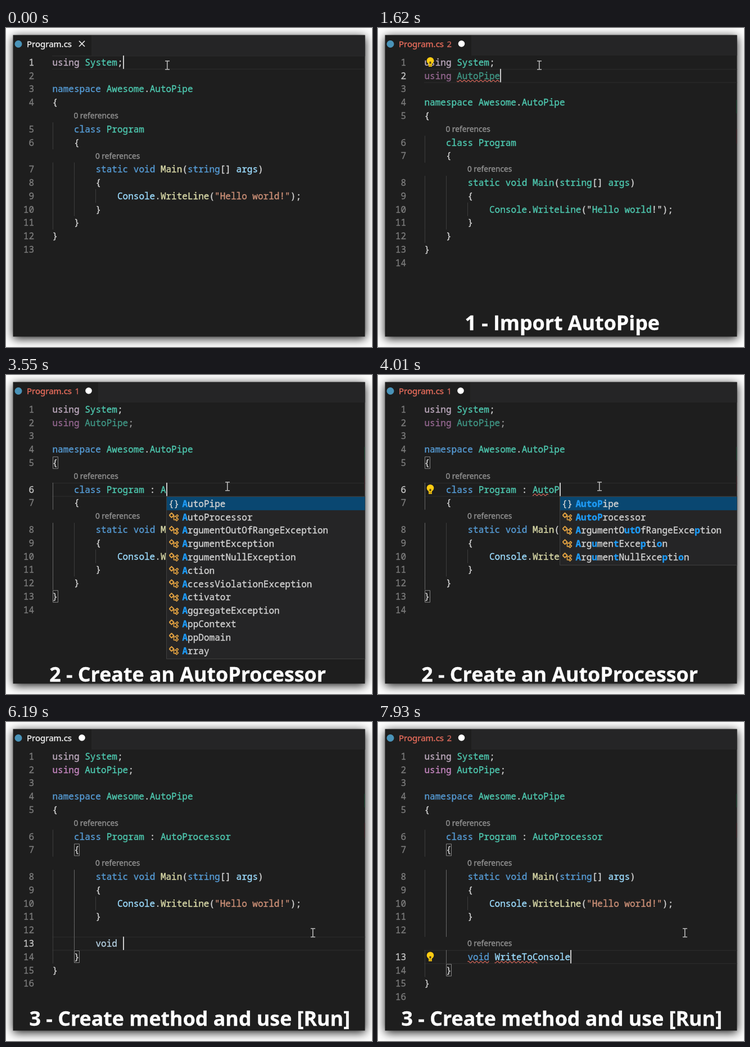
An HTML page with a canvas for the animation above (8000 ms loop, 651x568 px).

```html
<!DOCTYPE html>
<html lang="en">
<head>
<meta charset="utf-8">
<title>Editor walkthrough</title>
<style>
html, body { margin: 0; width: 100%; height: 100%; overflow: hidden; background: #fefefe; }
canvas { display: block; }
</style>
</head>
<body>
<canvas id="stage" width="651" height="568"></canvas>
<script>
const ctx = document.getElementById('stage').getContext('2d');
const LOOP = 8000, CHAR = 9.62, LEFT = 82.5, ROW = 23.8, TOP = 61;
const MONO = '"Noto Sans Mono", "DejaVu Sans Mono", monospace';
const SANS = '"Noto Sans", "Open Sans", sans-serif';
const COLOR = {
  bg: '#1e1e1e', bar: '#252526', text: '#d4d4d4', key: '#569cd6', type: '#4ec9b0',
  fn: '#dcdcaa', name: '#9cdcfe', str: '#ce9178', use: '#c586c0', match: '#1e9bf5',
  error: '#e86d5c', amber: '#e0a040'
};

const WORDS = {};
const addWords = (color, list) => list.split(' ').forEach(w => WORDS[w] = color);
addWords(COLOR.key, 'namespace class static void string');
addWords(COLOR.type, 'System Awesome AutoPipe Program AutoProcessor');
addWords(COLOR.fn, 'Main WriteLine');
addWords(COLOR.use, 'using');

// Keystrokes: each part of the text with the time it is entered
const USING = [[340, 'u'], [410, 's'], [480, 'i'], [550, 'n'], [620, 'g'], [770, ' '],
  [960, 'A'], [1030, 'u'], [1090, 't'], [1160, 'o'], [1290, 'P'], [1360, 'i'], [1490, 'p'], [1560, 'e'], [1750, ';']];
const BASE = [[3080, ' '], [3220, ':'], [3360, ' '],
  [3560, 'A'], [3690, 'u'], [3750, 't'], [3820, 'o'], [3950, 'P'], [4080, 'r'], [4340, 'ocessor']];
const METHOD = [[5920, 'v'], [5980, 'o'], [6050, 'i'], [6120, 'd'], [6190, ' '],
  [6390, 'W'], [6460, 'r'], [6530, 'i'], [6590, 't'], [6660, 'e'], [7050, 'T'], [7120, 'o'],
  [7320, 'C'], [7520, 'o'], [7650, 'n'], [7720, 's'], [7790, 'o'], [7860, 'l'], [7930, 'e']];
const ENTER = 200, CLICK1 = 2340, CLICK2 = 5490, ENTER2 = 5650, ENTER3 = 5790;
const STROKES = [0, ENTER, CLICK1, CLICK2, ENTER2, ENTER3, ...[...USING, ...BASE, ...METHOD].map(k => k[0])];

const within = (t, a, b) => t >= a && t < b;
const typed = (keys, t) => keys.filter(k => k[0] <= t).map(k => k[1]).join('');
const colX = col => LEFT + col * CHAR;

function rect(x, y, w, h, color) {
  ctx.fillStyle = color;
  ctx.fillRect(x, y, w, h);
}

function frame(x, y, w, h, color, width = 1) {
  ctx.strokeStyle = color;
  ctx.lineWidth = width;
  ctx.strokeRect(x, y, w, h);
}

function disc(x, y, r, color) {
  ctx.fillStyle = color;
  ctx.beginPath();
  ctx.arc(x, y, r, 0, 7);
  ctx.fill();
}

function path(points, color, width) {
  ctx.strokeStyle = color;
  ctx.lineWidth = width;
  ctx.beginPath();
  points.forEach(([x, y]) => ctx.lineTo(x, y));
  ctx.stroke();
}

// A hairline outline gives the text a little more weight
function write(text, x, y, font, color, align = 'left') {
  ctx.font = font;
  ctx.fillStyle = ctx.strokeStyle = color;
  ctx.lineWidth = 0.35;
  ctx.lineJoin = 'round';
  ctx.textAlign = align;
  ctx.fillText(text, x, y);
  ctx.strokeText(text, x, y);
}

const code = (text, x, y, color) => write(text, x, y + 5.8, `16.03px ${MONO}`, color);

// All lines of the file, with the row each one stands on
function buildLines(t) {
  const lines = [];
  let row = 0;
  const add = (id, text, lens) => {
    const lensRow = lens ? row++ : -1;
    lines.push({ id, text, lensRow, y: TOP + ROW * row++, n: lines.length + 1 });
  };
  add('system', 'using System;');
  if (t >= ENTER) add('using', typed(USING, t));
  add('', '');
  add('space', 'namespace Awesome.AutoPipe');
  add('spaceOpen', '{');
  add('class', '    class Program' + typed(BASE, t), true);
  add('classOpen', '    {');
  add('main', '        static void Main(string[] args)', true);
  add('mainOpen', '        {');
  add('body', '            Console.WriteLine("Hello world!");');
  add('mainClose', '        }');
  if (t >= ENTER2) add('blank', '        ');
  if (t >= ENTER3) add('method', '        ' + typed(METHOD, t), t >= 6660);
  add('classClose', '    }');
  add('spaceClose', '}');
  add('', '');
  return lines;
}

function activeId(t) {
  if (t < ENTER) return 'system';
  if (t < CLICK1) return 'using';
  if (t < CLICK2) return 'class';
  if (t < ENTER2) return 'mainClose';
  return t < ENTER3 ? 'blank' : 'method';
}

function activeScope(t) {
  if (t < 2610) return '';
  if (t < CLICK2) return 'space';
  return t < ENTER2 ? 'main' : 'class';
}

function wordColor(word, line, t, open) {
  if (word[0] === '"') return COLOR.str;
  if (!/\w/.test(word)) return COLOR.text;
  if (line.id === 'system' && word === 'using') return '#bfacc0';
  // An unfinished using directive swallows the names that follow it
  if (open && !['system', 'using'].includes(line.id)) return COLOR.type;
  if (line.id === 'method' && t < 6390) return '#b4cfe0';
  return WORDS[word] || (line.id === 'class' ? COLOR.type : COLOR.name);
}

function drawLine(line, t) {
  const open = within(t, 620, 1750);
  const parts = open ? /\w+|[^\w\s]+/g : /"[^"]*"|\w+|[^\w\s]/g;
  ctx.globalAlpha = line.id === 'using' && within(t, 1300, 4600) ? 0.65 : 1;
  for (const m of line.text.matchAll(parts))
    code(m[0], colX(m.index), line.y, wordColor(m[0], line, t, open));
  ctx.globalAlpha = 1;
}

function drawGuides(line, scope) {
  const indent = line.text.search(/\S|$/);
  const bright = { space: 0, class: 4, main: 8 }[scope];
  for (let col = 0; col < indent; col += 4)
    rect(Math.round(colX(col)), line.y - 12, 1, ROW + 0.4, col === bright ? '#686868' : '#3c3c3c');
}

function squiggle(from, to, y) {
  const points = [];
  for (let x = colX(from); x <= colX(to); x++) points.push([x, y + 9.5 + 1.5 * Math.sin(x * 0.85)]);
  path(points, '#d8695c', 1.2);
}

function drawBulb(y) {
  disc(93, y - 2.5, 6.3, '#ffcc12');
  rect(90, y + 1, 6, 7, '#ffcc12');
  rect(91.5, y - 1, 3, 4, '#5a4810');
  rect(90, y + 5, 6, 1.5, '#a8860c');
}

const ICONS = {
  word(x, y) {
    [-5, 0, 5].forEach((d, i) => {
      rect(x - 9, y + d - 1, 9 + i * 2, 2, '#c5c5c5');
      rect(x + 2 + i * 2, y + d - 1, 7 - i * 2, 2, '#c5c5c5');
    });
  },
  snippet(x, y) { frame(x - 8, y - 8, 16, 16, '#d8e4ec', 1.8); },
  space(x, y) { code('{}', x - 9.5, y, '#d4d4d4'); },
  key(x, y) { ICONS.word(x, y); },
  enum(x, y) {
    frame(x - 1, y - 7, 10, 8, COLOR.amber, 1.8);
    rect(x - 9, y - 2, 11, 9, COLOR.bar);
    frame(x - 8, y - 1, 10, 7, COLOR.amber, 1.8);
    rect(x - 6, y + 1.5, 6, 1.6, COLOR.amber);
    rect(x + 2, y - 4, 5, 1.6, COLOR.amber);
  },
  type(x, y) {
    path([[x - 8, y - 3], [x - 4, y - 7], [x, y - 3], [x - 4, y + 1], [x - 8, y - 3]], COLOR.amber, 2);
    path([[x - 2, y - 1], [x + 4, y - 1]], COLOR.amber, 1.6);
    path([[x, y - 1], [x, y + 5], [x + 4, y + 5]], COLOR.amber, 1.6);
    for (const d of [-1, 5])
      path([[x + 3, y + d], [x + 6, y + d - 3], [x + 8, y + d - 1], [x + 5, y + d + 2], [x + 3, y + d]], COLOR.amber, 1.6);
  }
};

const items = (kind, names) => names.split(' ').map(name => ({ kind, name }));
const USING_LIST = [...items('word', 'using'), ...items('snippet', 'using'),
  ...items('enum', 'UriHostNameType GenericUriParserOptions'), ...items('type', 'UnauthorizedAccessException')];
const SPACE_LIST = items('space', 'AutoPipe Awesome global');
const BASE_LIST = [...items('space', 'AutoPipe'), ...items('type',
  'AutoProcessor ArgumentOutOfRangeException ArgumentException ArgumentNullException Action AccessViolationException '
  + 'Activator AggregateException AppContext AppDomain Array')];
const VOID_LIST = [...items('key', 'void volatile'), ...items('type', 'ValueType Version')];
const WRITE_LIST = items('type', 'WeakReference TypedReference ArrayTypeMismatchException TypeUnloadedException');

function suggestions(t) {
  if (within(t, 340, 770)) return { list: USING_LIST.slice(0, t < 620 ? 5 : 2), selected: 1 };
  if (within(t, 960, 1600)) return { list: SPACE_LIST.slice(0, t < 1030 ? 3 : 1), selected: 0 };
  if (within(t, 3560, 4080)) return { list: BASE_LIST.slice(0, t < 3690 ? 12 : 5), selected: 0 };
  if (within(t, 4080, 4340)) return { list: BASE_LIST.slice(1, 2), selected: 0 };
  if (within(t, 5980, 6190)) return { list: VOID_LIST.slice(0, t < 6050 ? 4 : 1), selected: 0 };
  if (within(t, 6390, 7150)) return { list: WRITE_LIST.slice(t < 6660 ? 0 : 3), selected: 0 };
  return null;
}

// Fuzzy match: longest runs first, swapped letters looked up from the start
function matches(name, query) {
  const text = name.toLowerCase(), rest = query.toLowerCase(), hits = new Set();
  let from = 0;
  for (let i = 0; i < rest.length;) {
    let size = rest.length - i;
    while (size > 1 && text.indexOf(rest.substr(i, size), from) < 0) size--;
    const at = text.indexOf(rest.substr(i, size), from);
    if (at < 0) hits.add(text.indexOf(rest[i]));
    else {
      for (let k = 0; k < size; k++) hits.add(at + k);
      from = at + size;
    }
    i += size;
  }
  return hits;
}

function drawPopup({ list, selected }, x, y, query) {
  const top = y + 12.5, height = list.length * ROW + 4;
  rect(x, top, 660 - x, height, COLOR.bar);
  list.forEach(({ kind, name }, i) => {
    const cy = y + 25.2 + i * ROW;
    if (i === selected) {
      rect(x, cy - 12, 660 - x, ROW, '#094771');
      if (kind === 'snippet') write('Using statement', 524, cy + 5, `13.6px ${MONO}`, '#b5c6d2');
    }
    ICONS[kind](x + 13.5, cy);
    const hits = matches(name, query);
    [...name].forEach((ch, c) => {
      const hit = hits.has(c);
      write(ch, x + 28.5 + c * CHAR, cy + 5.8, `${hit ? 'bold ' : ''}16.03px ${MONO}`, hit ? COLOR.match : COLOR.text);
    });
  });
  frame(x + 0.5, Math.round(top) + 0.5, 660 - x, Math.round(height) - 1, '#3e3e3e');
}

function drawTab(t) {
  let errors = 0;
  if (within(t, 960, 2150) || t >= 6990) errors = 2;
  else if (within(t, 3290, 4600) || t >= 6530) errors = 1;
  const end = [152, 164, 166][errors], mark = [135, 147, 148.5][errors];
  rect(13, 13, 626, 36, COLOR.bar);
  rect(13, 13, end - 13, 36, COLOR.bg);
  disc(22, 28.5, 6.5, '#4a93b8');
  write('Program.cs', 37, 34.3, `15px ${SANS}`, errors ? COLOR.error : '#f4f4f4');
  if (errors) write(errors, 122.5, 33.6, `15px ${SANS}`, '#cc6559');
  if (t >= ENTER) return disc(mark, 28, 5.8, '#ffffff');
  path([[130, 23], [140, 33]], '#e8e8e8', 1.7);
  path([[140, 23], [130, 33]], '#e8e8e8', 1.7);
}

function drawMouse(t) {
  const stops = [[0, 287, 66], [1900, 287, 66], [2620, 394, 198], [5130, 394, 198], [5480, 546, 375], [LOOP, 546, 375]];
  const i = stops.findIndex(s => s[0] > t);
  const [t0, x0, y0] = stops[i - 1], [t1, x1, y1] = stops[i];
  const k = (t - t0) / (t1 - t0), ease = 1 - (1 - k) ** 3;
  const x = Math.round(x0 + (x1 - x0) * ease), y = Math.round(y0 + (y1 - y0) * ease);
  rect(x - 1, y - 7, 1.6, 15, '#b8b8b8');
  rect(x - 4, y - 8, 8, 1.5, '#b8b8b8');
  rect(x - 4, y + 7, 8, 1.5, '#b8b8b8');
}

function drawCaption(t) {
  const show = (text, x, y) => write(text, x, y, 'bold 35.8px "Open Sans", "Noto Sans", sans-serif', '#ffffff', 'right');
  if (within(t, 270, 1890)) show('1 - Import AutoPipe', 501, 538);
  if (within(t, 2290, 4800)) show('2 - Create an AutoProcessor', 569, 546);
  if (t >= 5330) show('3 - Create method and use [Run]', 612, 541);
}

function drawErrors(line, t) {
  if (line.id === 'using' && within(t, 1090, 1900)) squiggle(6, Math.min(14, line.text.length), line.y);
  if (line.id === 'class' && within(t, 3820, 4600)) squiggle(20, 23, line.y);
  if (line.id === 'method' && t >= 7050) {
    squiggle(8, 12, line.y);
    squiggle(13, Math.min(21, line.text.length), line.y);
  }
}

function drawWindow() {
  rect(0, 0, 651, 568, '#fefefe');
  ctx.save();
  ctx.shadowColor = 'rgba(0,0,0,0.9)';
  ctx.shadowBlur = 16;
  ctx.shadowOffsetY = 3;
  rect(12.5, 12.5, 626, 537, COLOR.bg);
  ctx.restore();
}

function draw(t) {
  drawWindow();
  ctx.save();
  ctx.beginPath();
  ctx.rect(12.5, 12.5, 626, 537);
  ctx.clip();
  drawTab(t);

  const lines = buildLines(t), scope = activeScope(t);
  const current = lines.find(l => l.id === activeId(t));
  const caret = colX(current.text.length);
  rect(82, current.y - 12, 557, 1.5, '#292929');
  rect(82, current.y + 11.5, 557, 1.5, '#292929');
  if (within(t, CLICK1, 3080)) rect(colX(10), current.y - 11.5, 7 * CHAR, ROW - 0.5, '#4c4d4d');

  for (const line of lines) {
    drawGuides(line, scope);
    if (scope && (line.id === scope + 'Open' || line.id === scope + 'Close')) {
      const x = Math.round(colX(line.text.length - 1));
      frame(x + 0.5, line.y - 10.5, 9, 21, '#858585');
    }
    write(line.n, 50, line.y + 5.8, `16.03px ${MONO}`, line === current ? '#c6c6c6' : '#7c7c7c', 'right');
    if (line.lensRow >= 0) {
      const x = colX(line.text.search(/\S/)) - 0.5;
      write('0 references', x, TOP + ROW * line.lensRow + 5, `13.7px ${SANS}`, '#929292');
    }
    drawLine(line, t);
    drawErrors(line, t);
  }

  if (within(t, 1420, 1750)) drawBulb(current.y - 24);
  if (within(t, 2700, 3080) || within(t, 3880, 4340) || t >= 6660) drawBulb(current.y);
  if (t >= 830) {
    rect(637.5, 128, 1, 24, '#1b5a3a');
    rect(637.5, 180, 1, 26, '#4a2026');
  }

  const last = Math.max(...STROKES.filter(s => s <= t));
  if ((t - last) % 1060 < 530) rect(Math.round(caret), current.y - 12, 2, ROW, '#c8c8c8');
  const popup = suggestions(t);
  if (popup) drawPopup(popup, Math.round(caret), current.y, current.text.match(/\w*$/)[0]);
  drawMouse(t);
  drawCaption(t);
  ctx.restore();
}

const start = performance.now();
function tick() {
  // Small lead keeps keystrokes ahead of the frame boundary
  draw(Math.min((performance.now() - start) % LOOP + 15, LOOP - 1));
  requestAnimationFrame(tick);
}
tick();
</script>
</body>
</html>
```
